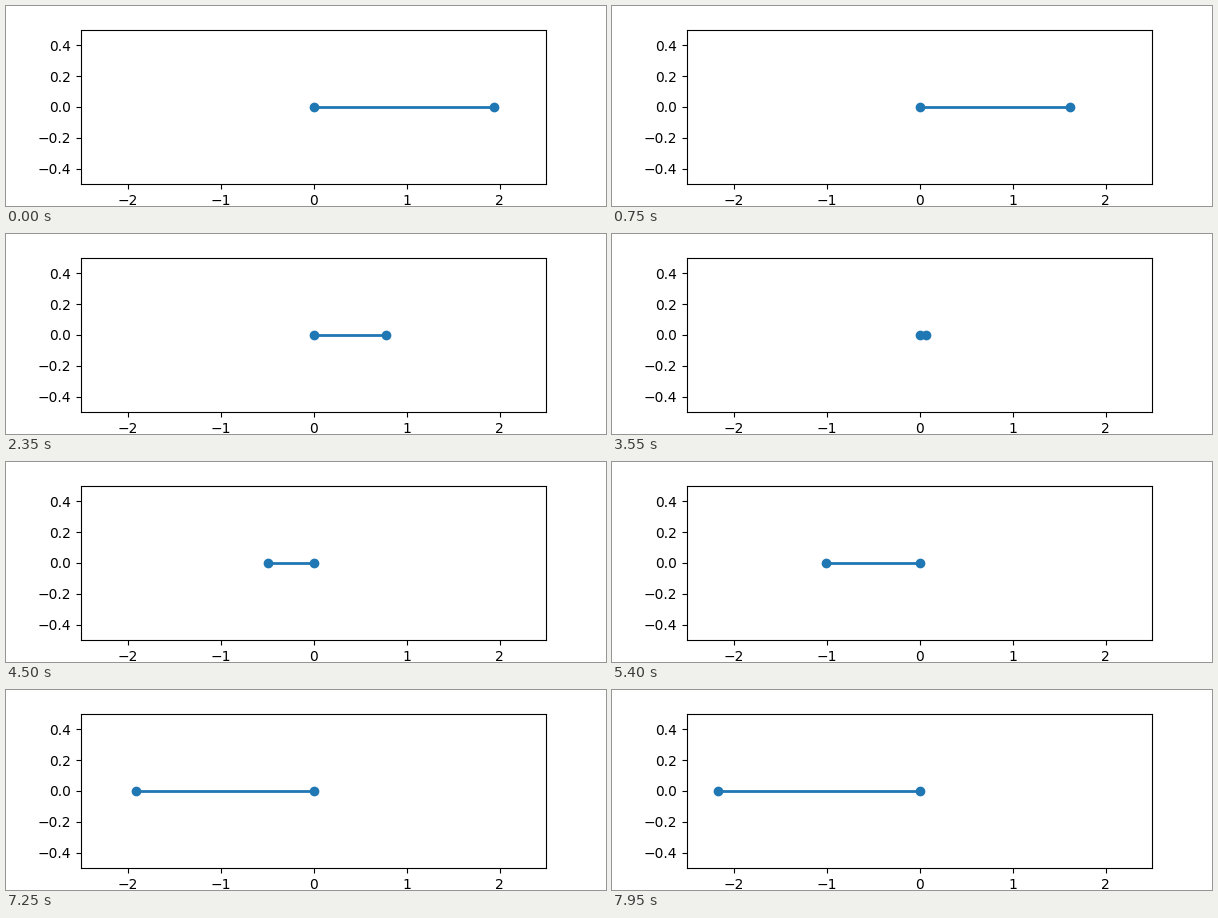
A matplotlib script for the animation above (8 s loop, 600 by 200 pixels).

```python
import numpy as np
import matplotlib.pyplot as plt
from matplotlib.animation import FuncAnimation

FRAMES = 160
INTERVAL = 50  # ms

AMPLITUDE = 2.6
OMEGA = 0.23   # rad/s
PHASE = 0.8443

fig, ax = plt.subplots(figsize=(6, 2), dpi=100)
ax.set_xlim(-2.5, 2.5)
ax.set_ylim(-0.5, 0.5)
ax.set_xticks([-2, -1, 0, 1, 2])
ax.set_yticks([-0.4, -0.2, 0.0, 0.2, 0.4])

line, = ax.plot([], [], "o-", lw=2, color="C0")


def position(t):
    """Displacement of the free end at time t in seconds."""
    return AMPLITUDE * np.sin(PHASE - OMEGA * t)


def update(i):
    line.set_data([0, position(i * INTERVAL / 1000)], [0, 0])
    return line,


def init():
    return update(0)


anim = FuncAnimation(fig, update, frames=FRAMES, init_func=init,
                     interval=INTERVAL, repeat=True, repeat_delay=0,
                     blit=False)
plt.show()
```
